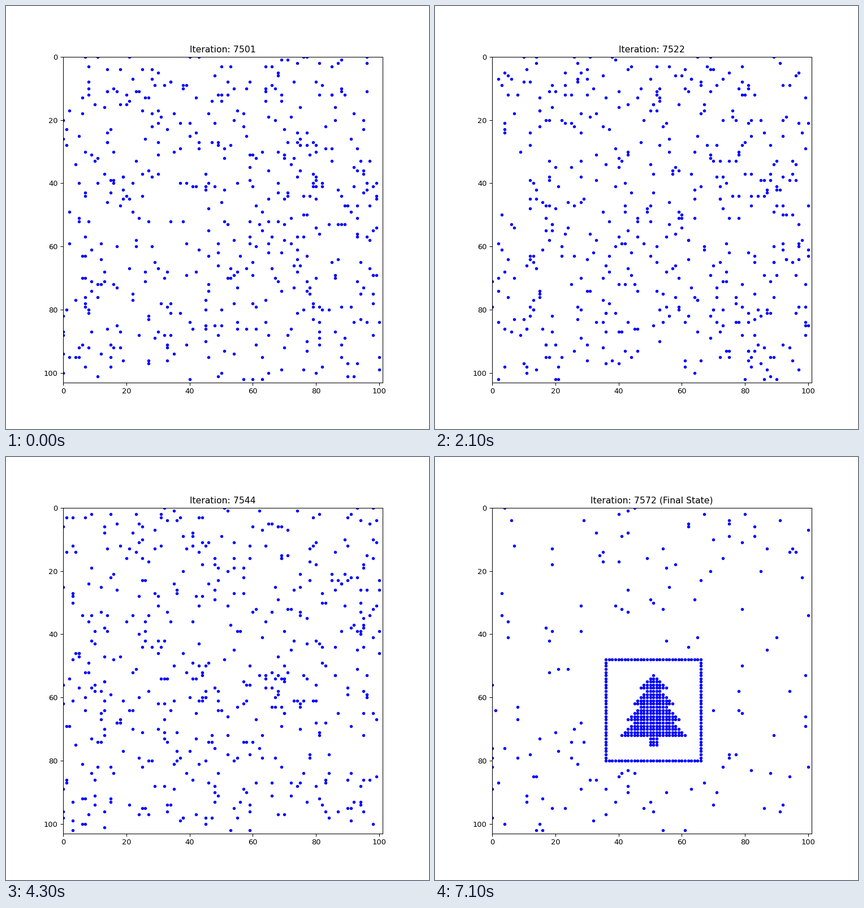
A matplotlib script that plays this animation: 748x748 px, repeating every 8 s.

```python
import numpy as np
import matplotlib.pyplot as plt
from matplotlib.animation import FuncAnimation

W, H = 101, 103
START, END = 7501, 7572
FRAMES, INTERVAL = 80, 100
BOX = (36, 48, 66, 80)  # left, top, right, bottom of the picture frame
ROBOTS = 500


def frame_cells():
    left, top, right, bottom = BOX
    rows = [(x, y) for y in (top, bottom) for x in range(left, right + 1)]
    cols = [(x, y) for x in (left, right) for y in range(top + 1, bottom)]
    return rows + cols


def tree_cells(cx=51, top=53):
    # Four tiers of five widening rows, then a short trunk
    halves = [2 * tier + k for tier in range(4) for k in range(5)] + [1] * 3
    return [(cx + dx, top + i)
            for i, half in enumerate(halves)
            for dx in range(-half, half + 1)]


def stray_cells(rng, count):
    # Distinct random cells that leave a one-cell margin around the frame
    left, top, right, bottom = BOX
    free = [(x, y) for y in range(H) for x in range(W)
            if not (left - 2 < x < right + 2 and top - 2 < y < bottom + 2)]
    return [free[i] for i in rng.choice(len(free), count, replace=False)]


rng = np.random.default_rng(14)
picture = frame_cells() + tree_cells()
final = np.array(picture + stray_cells(rng, ROBOTS - len(picture)))
velocity = rng.integers(-99, 100, size=final.shape)


def positions(step):
    # Constant velocity on a wrapping grid, timed to meet at END
    return (final + velocity * (step - END)) % (W, H)


fig, ax = plt.subplots(figsize=(8, 8), dpi=93.5)
ax.set_xlim(0, W)
ax.set_ylim(H, 0)
ax.set_aspect("equal")
dots = ax.scatter(*positions(START).T, s=10, c="blue")
title = ax.set_title(f"Iteration: {START}")


def update(i):
    step = min(START + i, END)
    dots.set_offsets(positions(step))
    suffix = " (Final State)" if step == END else ""
    title.set_text(f"Iteration: {step}{suffix}")
    return dots, title


anim = FuncAnimation(fig, update, frames=FRAMES, interval=INTERVAL,
                     repeat=True, repeat_delay=0, blit=False)
plt.show()
```
